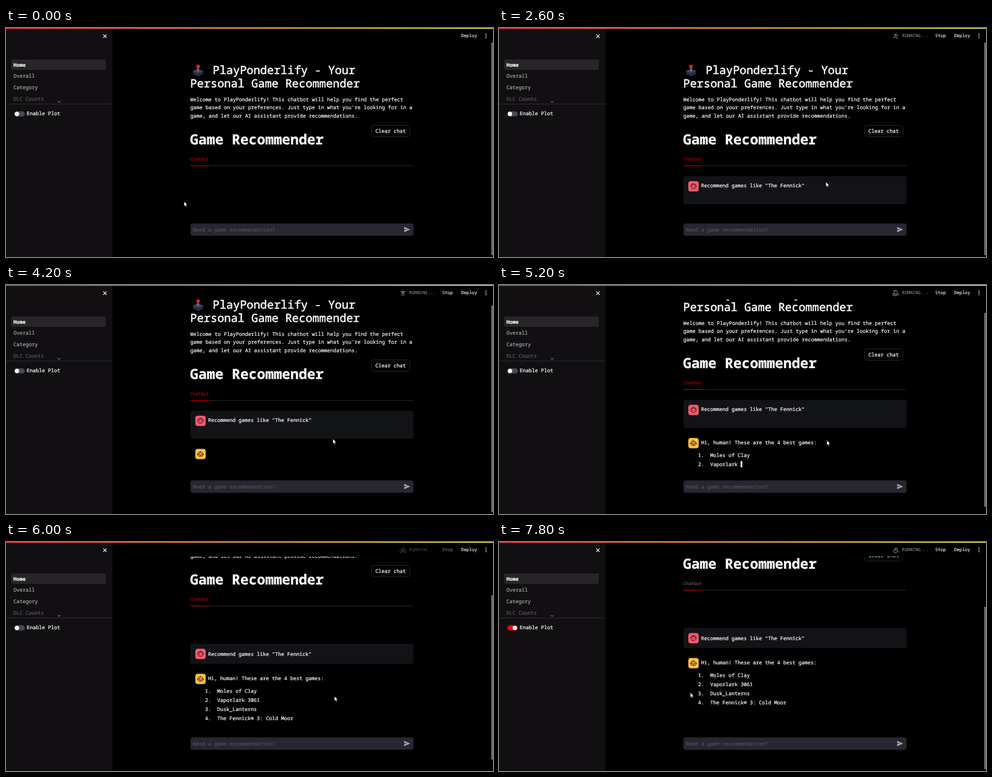
Write an HTML page that moves like this. It is 800 px wide and 378 px high and loops after 8000 ms.

```html
<!DOCTYPE html>
<html lang="en">
<head>
<meta charset="utf-8">
<title>Game recommender chat</title>
<style>
  html, body { margin: 0; height: 100%; overflow: hidden; background: #000; }
  svg { display: block; width: 100vw; height: 100vh; }
  text {
    font: 8.33px "Noto Sans Mono", "DejaVu Sans Mono", monospace; text-rendering: geometricPrecision;
    color: #fafafa; fill: currentColor; stroke: currentColor; stroke-width: .22;
  }
  .title { font-size: 18.6px; stroke-width: .55; }
  .heading { font-size: 22.9px; font-weight: 700; stroke-width: .3; }
  .small { font-size: 7.3px; stroke-width: .12; }
  .bold { font-weight: 700; }
  .line { fill: none; stroke-linecap: round; stroke-linejoin: round; }
</style>
</head>
<body>
<svg viewBox="0 0 800 378">
  <defs>
    <linearGradient id="rainbow"><stop stop-color="#f43c40"/><stop offset="1" stop-color="#f2f060"/></linearGradient>
    <clipPath id="viewport"><rect x="175" y="24" width="621" height="290"/></clipPath>
  </defs>
  <rect width="800" height="378"/>

  <g clip-path="url(#viewport)"><g id="page">
    <g id="joystick">
      <path d="M307 71L315.5 67.5L324 71V76L315.5 80L307 76Z" fill="#252b40"/>
      <path d="M307 71L315.5 67.5L324 71L315.5 75Z" fill="#3c425c"/>
      <path d="M315.5 71.5V65" stroke="#8e93a3" stroke-width="1.8"/>
      <circle cx="315.5" cy="63.5" r="3" fill="#dc2330"/>
      <ellipse cx="311" cy="71.2" rx="1.2" ry=".7" fill="#b52a3c"/>
    </g>
    <text class="title" x="339.5" y="76">PlayPonderlify - Your</text>
    <text class="title" x="302.5" y="98.2">Personal Game Recommender</text>
    <text x="302.7" y="121">Welcome to PlayPonderlify! This chatbot will help you find the perfect</text>
    <text x="302.7" y="134.4">game based on your preferences. Just type in what you're looking for in a</text>
    <text x="302.7" y="147.8">game, and let our AI assistant provide recommendations.</text>
    <text class="heading" x="302.3" y="192">Game Recommender</text>
    <rect x="600.5" y="160.5" width="63" height="19" rx="4" fill="#020203" stroke="#222328"/>
    <text x="606.8" y="172.8">Clear chat</text>
    <text class="small" id="tab" x="302.7" y="219">Chatbot</text>
    <path d="M303 227.5H669.5" stroke="#26272b"/>
    <path d="M303 227.5H333.5" stroke="#d60008"/>

    <g id="question">
      <rect id="bubble" x="303" width="366.5" rx="4" fill="#121316"/>
      <g id="userIcon">
        <rect x="-8.5" y="-8.5" width="17" height="17" rx="4" fill="#f5596c"/>
        <g class="line" stroke="#2a1419">
          <circle r="4.3"/><path d="M-4 -1Q-1 -1 .2 -3.8Q1.5 -1.2 4 -1"/>
        </g>
        <circle cx="-1.6" cy="1" r=".6"/><circle cx="1.6" cy="1" r=".6"/>
      </g>
      <text id="questionText" x="332"></text>
    </g>
    <g id="answer">
      <g transform="translate(319.5 1.5)">
        <rect x="-8.5" y="-8.5" width="17" height="17" rx="4" fill="#ffbd45"/>
        <g class="line" stroke="#33260e">
          <rect x="-3.4" y="-2.8" width="6.8" height="6.4" rx="1.2"/>
          <path d="M0 -3V-4.6M-4.8 -.5V1.5M4.8 -.5V1.5M-1.3 2H1.3"/>
        </g>
        <circle cx="-1.5" r=".8"/><circle cx="1.5" r=".8"/>
      </g>
      <g id="lines"></g>
    </g>
  </g></g>

  <rect x="303" y="322.5" width="366.5" height="20.5" rx="4" fill="#262730"/>
  <rect id="sendHover" x="648.5" y="322.5" width="21" height="20.5" rx="4" fill="#f00000"/>
  <path id="focusRing" d="M303.5 326Q303.5 322.5 307 322.5H666Q669.5 322.5 669.5 326" fill="none" stroke="#d30006"/>
  <text id="prompt" x="307" y="335.6"></text>
  <path id="send" d="M654 328.3L664 332.7L654 337.1V333.6L659.5 332.7L654 331.8Z"/>

  <rect width="175" height="378" fill="#110f11"/>
  <path class="line" d="M160 11L165 16M165 11L160 16" stroke="#e8e8e8" stroke-width="1.1"/>
  <rect x="8.5" y="52" width="155.5" height="17" rx="2.5" fill="#272528"/>
  <text class="bold" x="12.3" y="63.5">Home</text>
  <text x="12.3" y="82.2" style="color:#a4a3a5">Overall</text>
  <text x="12.3" y="101" style="color:#a4a3a5">Category</text>
  <text x="12.3" y="119.7" style="color:#59585b">DLC Counts</text>
  <path class="line" d="M85.3 121L87.3 123L89.3 121" stroke="#a4a3a5"/>
  <path d="M0 125.5H175" stroke="#2c2b2e"/>
  <rect id="track" x="13.5" y="137.5" width="17.5" height="8.6" rx="4.3"/>
  <circle id="knob" cy="141.8" r="3.6" fill="#fff"/>
  <text x="34" y="144.2">Enable Plot</text>

  <rect width="800" height="1.3" fill="url(#rainbow)"/>
  <g id="status">
    <path id="sport" class="line" transform="translate(652 12.5)" stroke="#77787d" stroke-width="1.2"/>
    <text class="small" x="662" y="15.3" style="color:#85868b">RUNNING...</text>
    <text class="small" x="716.5" y="15.3">Stop</text>
  </g>
  <text class="small" x="747.6" y="15.3">Deploy</text>
  <path class="line" d="M788.5 9.8h0M788.5 12.8h0M788.5 15.8h0" stroke="#fafafa" stroke-width="1.8"/>
  <rect id="thumb" x="797" width="3" fill="#68686b"/>

  <g id="pointer" stroke="#111" stroke-width=".6">
    <path id="arrow" d="M0 0V8L1.8 6.4L3 9L4.4 8.4L3.2 5.8H5.6Z" fill="#fff"/>
    <path id="hand" d="M-1 0Q0 -1.2 1 0V3L4.5 4Q5.3 4.5 5 6L4.3 9H-.5L-3 5.5Q-2.5 4.2 -1 5.3Z" fill="#fff"/>
    <path id="beam" class="line" d="M-1.5 -4H1.5M0 -4V4M-1.5 4H1.5" style="stroke:#ddd"/>
  </g>
</svg>
<script>
const LOOP = 8000, STEP = 200;
const QUESTION = 'Recommend games like "The Fennick"';
const ANSWER = [
  'Hi, human! These are the 4 best games:',
  '1. Moles of Clay',
  '2. Vaporlark 3061',
  '3. Dusk_Lanterns',
  '4. The Fennick® 3: Cold Moor',
].map(line => line.split(' '));

const person = 'M0 -4.6h0M-4 -2H4M0 -2V1M-1.5 -2V5M1.5 -2V5M-1.5 1H1.5';
const runner = 'M1.5 -4.5h0M-3 -1L0 -2.5L2 0H4M0 -2L-1 1.5L2 3V5.5M-1 1.5L-4 4';
const bike = 'M-5 3a2 2 0 1 0 4 0a2 2 0 1 0 -4 0M1 3a2 2 0 1 0 4 0a2 2 0 1 0 -4 0M1 -5h0M0 3V1L-2 -.5L1 -3L2.5 -1H4';
const wheelchair = 'M0 -5h0M0 -3L-1 1H2.5L4 4.5M0 -2L3 -1M-2 -.5A3 3 0 1 0 2 3.5';
const swimmer = 'M3 -1.5h0M-4 -3L0 -4L2 -1M-1 -3L-3 0M-5 2Q-3.5 .5 -2 2T1 2T4 2M-5 4.5Q-3.5 3 -2 4.5T1 4.5T4 4.5';
const SPORTS = [person, runner, bike, wheelchair, wheelchair, swimmer, runner];

// Rows are [time, value, value, ...]
const POINTER = [
  [0, 292.5, 286.3], [200, 292.5, 286.3], [600, 400, 333], [1400, 400, 333], [1800, 660.8, 331.8],
  [2000, 660.8, 331.8], [2600, 537, 254], [4200, 537, 254], [5200, 538.5, 256.3], [6000, 539.5, 254.5],
  [6200, 539.5, 254.5], [6800, 22, 142], [7400, 22, 142], [7800, 314.2, 248.5],
];
const SCROLL = [[3600, 0], [4000, 37], [4800, 37], [5200, 55], [5600, 85], [6000, 122], [6400, 148]];
const THUMB = [
  [2800, 24, 375], [3000, 24, 346], [3600, 24, 346], [4200, 34, 375], [5200, 46, 366],
  [6000, 88, 359], [6400, 107, 375],
];

const $ = id => document.getElementById(id);
const set = (id, attrs) => { for (const key in attrs) $(id).setAttribute(key, attrs[key]); };
const show = (id, on) => set(id, { visibility: on ? 'visible' : 'hidden' });
const move = (id, x, y) => set(id, { transform: `translate(${x} ${y})` });
const write = (id, text) => { $(id).textContent = text; };

function at(rows, t) {
  const next = rows.findIndex(row => row[0] > t);
  if (next === 0) return rows[0].slice(1);
  if (next < 0) return rows[rows.length - 1].slice(1);
  const a = rows[next - 1], b = rows[next];
  const k = (t - a[0]) / (b[0] - a[0]);
  return a.slice(1).map((v, i) => v + (b[i + 1] - v) * k);
}

$('lines').innerHTML = ANSWER.map((_, i) => {
  const y = i ? 24.5 + (i - 1) * 15 : 3;
  return i
    ? `<text id="number${i}" x="327" y="${y}"></text><text id="line${i}" x="347" y="${y}"></text>`
    : `<text id="line0" x="332" y="${y}"></text>`;
}).join('');

function drawAnswer(t) {
  let left = Math.max(0, Math.floor((t - 4500) / 50));
  ANSWER.forEach((words, i) => {
    const shown = words.slice(0, left);
    const isLast = left > 0 && left <= words.length && t < 5700;
    left = Math.max(0, left - words.length);
    if (i) write('number' + i, shown.shift() || '');
    if (isLast) shown.push('▌');
    write('line' + i, shown.join(' '));
  });
}

function drawChat(t) {
  const settled = t >= 5800;
  const top = settled ? 290 : 244.5;
  const height = settled ? 33 : 46.5;
  move('page', 0, -at(SCROLL, t)[0]);
  show('question', t >= 2400);
  show('answer', t >= 3000);
  set('bubble', { y: top, height });
  move('userIcon', 319.5, top + 16.7);
  set('questionText', { y: top + (settled ? 19.5 : 18) });
  write('questionText', QUESTION);
  move('answer', 0, top + height + 23.5);
  drawAnswer(t);
  $('tab').style.color = t >= 7600 ? '#68686b' : '#c00008';
}

function drawInput(t) {
  const focused = t >= 600 && t < 2200;
  const typed = t < 2000 ? QUESTION.slice(0, Math.max(0, Math.ceil((t - 600) / 800 * QUESTION.length))) : '';
  const hover = t >= 1800 && t < 2200;
  write('prompt', typed || 'Need a game recommendation?');
  $('prompt').style.color = typed ? '#fafafa' : '#50515a';
  show('focusRing', focused);
  show('sendHover', hover && typed);
  set('send', { fill: hover && typed ? '#fff' : typed ? '#e00008' : '#a5a8b0' });
}

function drawChrome(t) {
  const enabled = t >= 7400;
  set('track', { fill: enabled ? '#f00000' : '#474954' });
  set('knob', { cx: enabled ? 26 : 18 });
  show('status', (t >= 2400 && t < 6200) || t >= 7600);
  set('status', { opacity: t === 6000 ? 0.45 : 1 });
  set('sport', { d: SPORTS[t / STEP % SPORTS.length] });
  const [top, bottom] = at(THUMB, t);
  set('thumb', { y: top, height: bottom - top });
}

function drawPointer(t) {
  const [x, y] = at(POINTER, t);
  const overField = x > 303 && x < 648 && y > 322;
  const overControl = (x > 648 && y > 322) || x < 90;
  move('pointer', x, y);
  show('beam', overField);
  show('hand', overControl);
  show('arrow', !overField && !overControl);
}

const started = performance.now();
function frame() {
  const elapsed = Math.max(0, performance.now() - started) % LOOP;
  const t = Math.floor(elapsed / STEP) * STEP;
  drawChat(t);
  drawInput(t);
  drawChrome(t);
  drawPointer(t);
  requestAnimationFrame(frame);
}
frame();
</script>
</body>
</html>
```
